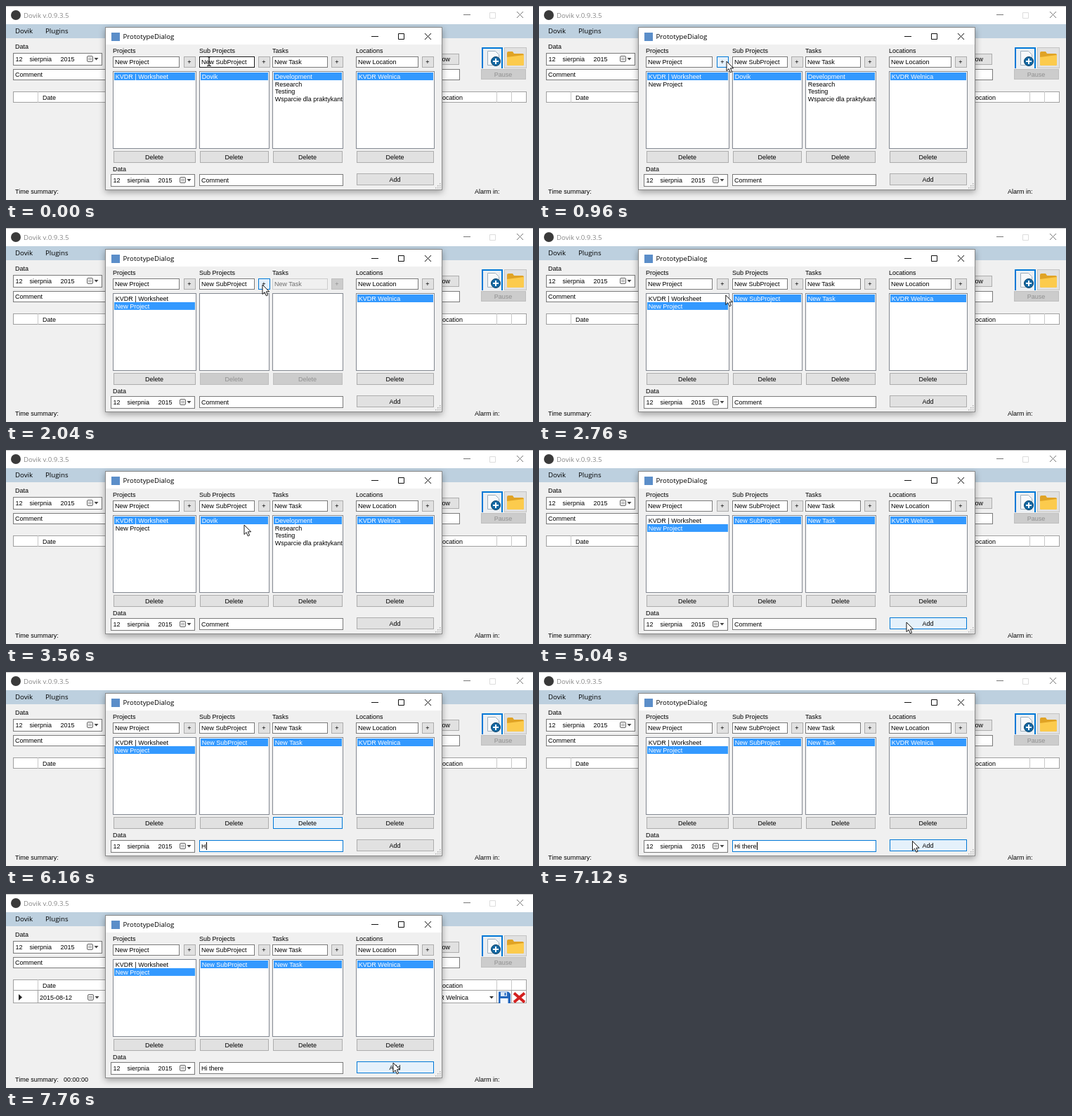
An HTML page that plays this animation: 750x277 px, repeating every 8000 ms.

```html
<!DOCTYPE html>
<html lang="en">
<head>
<meta charset="utf-8">
<title>Project dialog</title>
<style>
  html, body { margin: 0; width: 100%; height: 100%; overflow: hidden; background: #f0f0f0; }
  svg { display: block; width: 100%; height: 100%; }
  text { font: 9px "Liberation Sans", Arial, sans-serif; white-space: pre; }
  .ui { font: 9.7px "Open Sans", "Noto Sans", sans-serif; }
</style>
</head>
<body>
<svg id="stage" viewBox="0 0 750 277">
  <defs>
    <filter id="shadow" x="-10%" y="-10%" width="120%" height="125%">
      <feDropShadow dx="0" dy="3" stdDeviation="5" flood-opacity=".35"/>
    </filter>
  </defs>
  <g id="back"></g>
  <g id="rowLayer"></g>
  <g id="dialog"></g>
  <g id="live"></g>
</svg>
<script>
const LOOP = 8000;
const BLUE = '#0078d7', SELECT = '#3399ff', EDGE = '#7a7a7a', FACE = '#f0f0f0';
const APP = 'Dovik', PROJECT = 'KVDR | Worksheet', PLACE = 'KVDR Welnica';
const TASKS = ['Development', 'Research', 'Testing', 'Wsparcie dla praktykant'];
const $ = id => document.getElementById(id);

const pen = document.createElement('canvas').getContext('2d');
pen.font = '9px "Liberation Sans", Arial, sans-serif';
const widthOf = s => pen.measureText(s).width;

// Drawing helpers: each returns SVG markup
const fillRect = (x, y, w, h, fill) =>
  `<rect x="${x}" y="${y}" width="${w}" height="${h}" fill="${fill}"/>`;
const box = (x, y, w, h, fill, stroke) =>
  `<rect x="${x + .5}" y="${y + .5}" width="${w - 1}" height="${h - 1}" fill="${fill}" stroke="${stroke}"/>`;
const path = (d, fill, stroke = 'none', width = 1) =>
  `<path d="${d}" fill="${fill}" stroke="${stroke}" stroke-width="${width}"/>`;
const text = (x, y, s, fill = '#000', anchor = 'start', cls = '') =>
  `<text x="${x}" y="${y}" fill="${fill}" text-anchor="${anchor}" class="${cls}">${s}</text>`;

function button(r, label, { off = false, hot = false, down = false } = {}) {
  const fill = off ? '#ccc' : down ? '#cce4f7' : hot ? '#e5f1fb' : '#e1e1e1';
  const edge = off ? '#bfbfbf' : hot ? BLUE : '#adadad';
  const [x, y, w, h] = r;
  return box(x, y, w, h, fill, edge) +
    text(x + w / 2 - .5, y + h / 2 + 3.2, label, off ? '#909090' : '#000', 'middle');
}

function field(r, label, { off = false, hot = false, focus = false } = {}) {
  const edge = off ? '#ccc' : focus ? BLUE : hot ? '#171717' : EDGE;
  return box(...r, off ? FACE : '#fff', edge) +
    text(r[0] + 3, r[1] + r[3] / 2 + 3, label, off ? '#6d6d6d' : '#000');
}

function list([x, y, w, h], items, selected) {
  return box(x, y, w, h, '#fff', '#828790') + items.map((s, i) => {
    const top = y + 2 + i * 10.9, on = i === selected;
    return (on ? fillRect(x + 2, top, w - 4, 11, SELECT) : '') +
      text(x + 3.8, top + 8.6, s, on ? '#fff' : '#000');
  }).join('');
}

const calendar = (x, y) =>
  `<rect x="${x + .5}" y="${y + .5}" width="8" height="8" rx="1.5" fill="#ececec" stroke="#6a6a6a"/>` +
  path(`M${x + 2} ${y + 3.5}h5M${x + 2} ${y + 5.5}h5`, 'none', '#a0a0a0', .9) +
  path(`M${x + 10.5} ${y + 3}h6l-3 3.4z`, '#444');

const datePicker = (x, y, w) =>
  box(x, y, w, 18, '#fff', EDGE) + text(x + 3.5, y + 12, '12') +
  text(x + 23.5, y + 12, 'sierpnia') + text(x + 67.5, y + 12, '2015') +
  calendar(x + w - 22, y + 4);

const minKey = (x, y, color) => path(`M${x} ${y + .5}h10`, 'none', color);
const maxKey = (x, y, color) => path(`M${x + .5} ${y - 3.5}h8v8h-8z`, 'none', color);
const closeKey = (x, y, color) => path(`M${x} ${y - 4}l9 9m0 -9l-9 9`, 'none', color);

function drawBack() {
  const toolbar =
    fillRect(677, 59, 30, 30, '#ebeff3') +
    path('M678 89v-29h28v29', 'none', BLUE, 2) +
    path('M685.5 64.500h11l5 5v15h-16z', '#f7f9fa', '#9fb0bd') +
    '<circle cx="697" cy="79" r="6.5" fill="#1469a4" stroke="#0b4267"/>' +
    path('M697 75v8M693 79h8', 'none', '#fff', 2) +
    box(709, 59, 32, 30, '#e1e1e1', '#c4c4c4') +
    path('M713 67q0-2 2-2h6l2 3h12q2 0 2 2v13q0 2-2 2h-20q-2 0-2-2z', '#e0a325') +
    path('M713 73l24-3v13q0 2-2 2h-20q-2 0-2-2z', '#fccb4d');

  return fillRect(0, 0, 750, 277, FACE) + fillRect(0, 0, 750, 26, '#fff') +
    fillRect(0, 0, 750, 1, '#c4c4c4') +
    '<circle cx="14" cy="13" r="7" fill="#3a3a3a"/>' +
    text(25, 16.5, APP + ' v.0.9.3.5', '#888', 'start', 'ui') +
    minKey(651, 12, '#777') + maxKey(688, 13, '#ddd') + closeKey(727, 12, '#777') +
    fillRect(0, 26, 750, 20, '#bdd0df') +
    text(13, 38.5, APP, '#000', 'start', 'ui') + text(56, 38.5, 'Plugins', '#000', 'start', 'ui') +
    text(13, 61, 'Data') + datePicker(10, 67, 127) +
    field([10, 90, 636, 16], 'Comment') +
    box(590, 68, 55, 16, '#e1e1e1', '#adadad') + text(632, 79, 'Show', '#000', 'end') +
    toolbar + button([676, 90, 64, 15], 'Pause', { off: true }) +
    box(10, 122, 731, 16, '#fff', '#a0a0a0') +
    path('M45.5 122v16M141.5 122v16M698.5 122v16M719.5 122v16', 'none', '#c8c8c8') +
    text(52, 133.5, 'Date') + text(650, 133.5, 'Location', '#000', 'end') +
    text(13, 268, 'Time summary:') + text(667, 268, 'Alarm in:');
}

function drawRow() {
  return box(10, 137, 731, 19, '#fff', '#a0a0a0') +
    path('M45.5 137v19M141.5 137v19M698.5 137v19M719.5 137v19', 'none', '#a0a0a0') +
    path('M18 143l5 4.5l-5 4.5z', '#222') +
    text(48, 150.5, '2015-08-12') + calendar(116, 143) +
    text(658, 150.5, PLACE, '#000', 'end') + path('M688 146h6l-3 3.4z', '#333') +
    path('M701 139.500h14l3 3v13.500h-17z', '#2467bd') +
    fillRect(704, 140, 9, 6, '#dbe8f7') + fillRect(709.5, 141, 2, 4, '#2467bd') +
    fillRect(703.5, 149, 11, 7, '#f4f7fb') +
    path('M723 141.500l15 13m0-13l-15 13', 'none', '#d3201f', 4) +
    text(82, 268, '00:00:00');
}

function drawDialog() {
  const grip = [[617, 256], [617, 259], [614, 259], [617, 253], [614, 256], [611, 259]];
  return `<g filter="url(#shadow)">${box(141, 30, 480, 233, FACE, '#8a8a8a')}</g>` +
    fillRect(142, 31, 478, 24, '#fff') + fillRect(150, 38, 12, 12, '#5b8ec9') +
    text(166.5, 47, 'PrototypeDialog', '#000', 'start', 'ui') +
    minKey(520, 43, '#111') + maxKey(558, 43, '#111') + closeKey(596, 43, '#111') +
    text(152, 67, 'Projects') + text(275, 67, 'Sub Projects') +
    text(379, 67, 'Tasks') + text(498, 67, 'Locations') +
    text(152, 236, 'Data') + datePicker(149, 240, 120) +
    grip.map(([x, y]) => fillRect(x, y, 1.5, 1.5, '#b0b0b0')).join('');
}

// Pointer stops: time, x, y
const STOPS = [
  [0, 289, 79], [40, 289, 79], [400, 244, 81], [840, 267, 79], [1000, 267, 79],
  [1340, 205, 112], [1440, 205, 112], [1960, 365, 81], [2140, 365, 81],
  [2480, 471, 81], [2600, 471, 81], [2840, 196, 101], [2900, 196, 101],
  [3200, 347, 105], [3480, 347, 105], [3560, 339, 107], [3720, 178, 112],
  [4120, 178, 112], [4920, 500, 219], [5020, 523, 246], [5200, 523, 246],
  [5480, 277, 248], [5520, 277, 248], [5760, 440, 216], [6880, 440, 216],
  [7200, 548, 246], [7520, 548, 246], [7700, 551, 241], [LOOP, 551, 241]
];

function pointerAt(t) {
  const i = STOPS.findIndex(s => s[0] > t);
  const [t0, x0, y0] = STOPS[i - 1], [t1, x1, y1] = STOPS[i];
  const p = (t - t0) / (t1 - t0), e = p * p * (3 - 2 * p);
  return [x0 + (x1 - x0) * e, y0 + (y1 - y0) * e];
}

const arrow = (x, y) =>
  path(`M${x} ${y}v13.600l3.100-3l2.200 5.200l2.300-1l-2.200-5h4.200z`, '#fff', '#000', .9);
const beam = (x, y) =>
  path(`M${x - 3} ${y - 6.5}h2l1 1l1-1h2M${x} ${y - 6}v12M${x - 3} ${y + 6.5}h2l1-1l1 1h2`, 'none', '#000', 1.1);

const COLUMNS = [
  { x: 152, w: 119, input: 95, plus: 253, name: 'New Project' },
  { x: 275, w: 100, input: 79, plus: 359, name: 'New SubProject' },
  { x: 379, w: 101, input: 79, plus: 463, name: 'New Task' },
  { x: 498, w: 112, input: 89, plus: 592, name: 'New Location' }
];
const COMMENT = [275, 240, 205, 17], ADD = [499, 239, 110, 17];
const KEYS = [6160, 6240, 6300, 6360, 6440, 6500, 6560, 6640];

function listsAt(t) {
  const chosen = t < 1400 ? 0 : t < 2860 ? 1 : t < 3720 ? 0 : 1;
  const projects = t < 900 ? [PROJECT] : [PROJECT, 'New Project'];
  const subs = !chosen ? [APP] : t < 2080 ? [] : ['New SubProject'];
  const tasks = !chosen ? TASKS : t < 2560 ? [] : ['New Task'];
  return { chosen, items: [projects, subs, tasks, [PLACE]] };
}

function drawComment(t, x, hot) {
  const focus = t >= 5520 && t < 7360;
  const typed = 'Hi there'.slice(0, KEYS.filter(k => t >= k).length);
  const label = typed || 'Comment';
  let out = field(COMMENT, label, { hot, focus });
  if (!focus) return out;
  const left = COMMENT[0] + 3;
  if (typed) {
    out += fillRect(left + widthOf(typed) + .5, 243, 1, 11, '#000');
  } else {
    let n = 0;
    while (n < label.length && left + widthOf(label.slice(0, n + 1)) <= x) n++;
    const part = label.slice(0, n);
    if (n) out += fillRect(left, 243, widthOf(part), 11, SELECT) + text(left, 251.5, part, '#fff');
  }
  return out;
}

function drawLive(t) {
  const [x, y] = pointerAt(t);
  const dragging = t >= 5520 && t < 5900;
  const over = ([bx, by, w, h]) => !dragging && x >= bx && x < bx + w && y >= by && y < by + h;
  const { chosen, items } = listsAt(t);
  let overInput = dragging, out = '';

  COLUMNS.forEach((c, i) => {
    const input = [c.x, 72, c.input, 16], plus = [c.plus, 72, 17, 16];
    const remove = [c.x + 1, 207, c.w - 2, 17];
    const off = i === 2 && !items[1].length;
    overInput = overInput || over(input);
    out += field(input, c.name, { off, hot: over(input) }) +
      button(plus, '+', { off, hot: over(plus) }) +
      list([c.x, 93, c.w, 111], items[i], i ? 0 : chosen) +
      button(remove, 'Delete', { off: !items[i].length, hot: over(remove) });
  });

  overInput = overInput || over(COMMENT);
  out += drawComment(t, x, over(COMMENT)) +
    button(ADD, 'Add', { hot: over(ADD), down: t >= 7360 && t < 7520 });
  if (t < 6160 || t >= 6880) out += overInput ? beam(x, y) : arrow(x, y);
  return out;
}

$('back').innerHTML = drawBack();
$('rowLayer').innerHTML = drawRow();
$('dialog').innerHTML = drawDialog();

let last = '';
function render(t) {
  $('rowLayer').setAttribute('visibility', t >= 7520 ? 'visible' : 'hidden');
  const markup = drawLive(t);
  if (markup !== last) $('live').innerHTML = last = markup;
}

const start = performance.now();
function tick() {
  render((performance.now() - start) % LOOP);
  requestAnimationFrame(tick);
}
tick();
</script>
</body>
</html>
```
